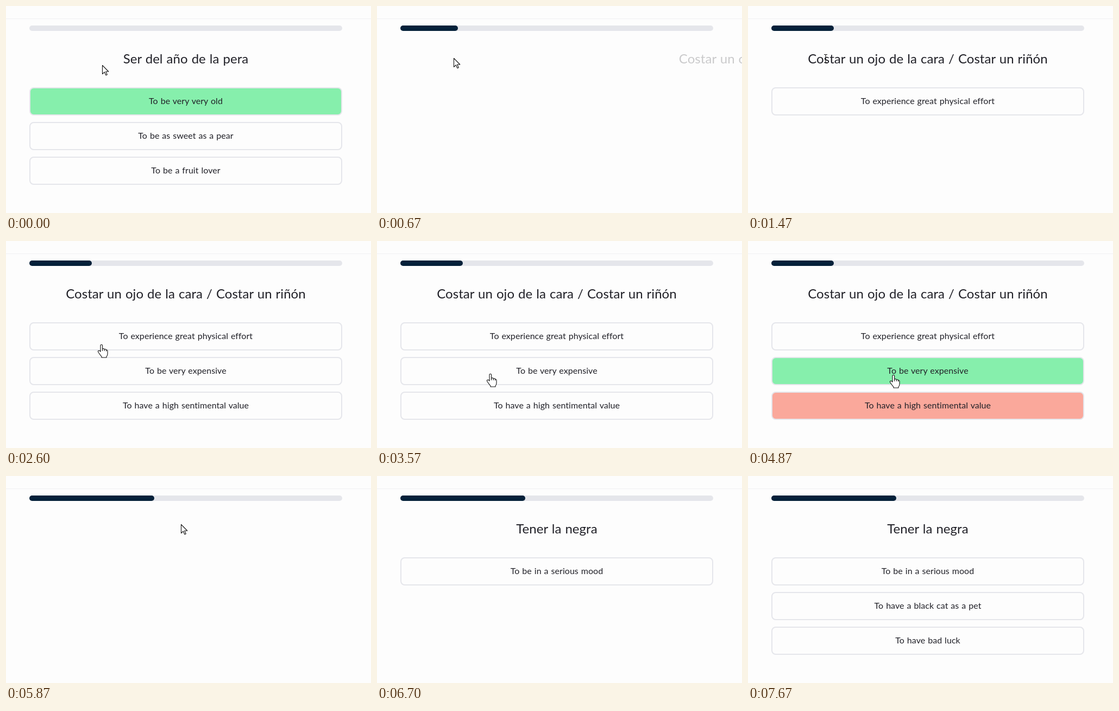
Write an HTML page that moves like this. It is 672 px wide and 382 px high and loops after 7.71 s.

```html
<!DOCTYPE html>
<html lang="en">
<head>
<meta charset="utf-8">
<title>Idiom quiz</title>
<style>
  html, body { margin: 0; width: 100%; height: 100%; overflow: hidden; }
  body {
    position: relative; background: #fdfdfd; color: #212128; cursor: default;
    font-family: Lato, "Open Sans", sans-serif;
    letter-spacing: .003em; word-spacing: .05em; text-align: center;
  }
  div, svg { position: absolute; box-sizing: border-box; }
  #rule { left: 0; top: 23px; width: 100%; height: 1px; background: #f0f0f2; }
  #track, #fill { left: 43px; top: 36px; width: 576px; height: 10px; border-radius: 5px; }
  #track { background: #e5e6eb; }
  #fill { background: #05213a; }
  #card { left: 43px; top: 0; width: 576px; height: 382px; }
  #title { top: 81px; width: 576px; font-size: 24px; line-height: 32px; white-space: nowrap; }
  .option {
    left: 0; width: 576px; height: 52px; border: 2px solid #e5e6eb; border-radius: 8px;
    font-size: 16px; line-height: 46px; white-space: nowrap;
  }
  #pointer { left: 0; top: 0; overflow: visible; }
  #pointer g { fill: #fff; stroke: #111; stroke-width: 1.1; stroke-linejoin: round; }
</style>
</head>
<body>
<div id="rule"></div>
<div id="track"></div>
<div id="fill"></div>
<div id="card"><div id="title"></div></div>
<svg id="pointer" width="1" height="1">
  <g id="arrow"><path d="M.5 .5V16.5L4.3 12.9L7 18.8L9.3 17.8L6.7 12H11.8Z"/></g>
  <g id="beam"><path fill="none" d="M-3-7.5H-1Q0-7.5 0-6.5Q0-7.5 1-7.5H3M0-6.5V6.5M-3 7.5H-1Q0 7.5 0 6.5Q0 7.5 1 7.5H3"/></g>
  <g id="hand">
    <path d="M-2 13V2a1.8 1.8 0 0 1 3.6 0V8q3.4-1 3.6 1q3-.8 3.4 1q2.4-.3 2.4 2.3v5q0 3-2 5v1.7h-9v-1.7q-3.5-4-6-8q-1.5-3 1-3t3 2z"/>
    <path fill="none" d="M1.6 8v4M5.2 9v3M8.6 10v2.5"/>
  </g>
</svg>
<script>
const LOOP = 7710, WIDTH = 576, DROP = 50;
const GOOD = '134,239,172', BAD = '250,168,155';

const scenes = [
  { enter: -5000, leave: 50, title: 'Ser del año de la pera', half: 115,
    options: ['To be very very old', 'To be as sweet as a pear', 'To be a fruit lover'],
    answer: -1000, colors: [GOOD] },
  { enter: 630, leave: 5250, title: 'Costar un ojo de la cara / Costar un riñón', half: 219,
    options: ['To experience great physical effort', 'To be very expensive', 'To have a high sentimental value'],
    answer: 4250, colors: [null, GOOD, BAD] },
  { enter: 5830, leave: 99999, title: 'Tener la negra', half: 75,
    options: ['To be in a serious mood', 'To have a black cat as a pet', 'To have bad luck'],
    answer: 99999, colors: [] }
];

// time, x, y of the pointer's hot spot
const path = [
  [0, 177, 109], [450, 141, 96], [1600, 143, 97], [2400, 170, 182], [3200, 205, 240],
  [3570, 209, 245], [4050, 250, 302], [4350, 254, 304], [4800, 268, 247],
  [5100, 270, 246], [5750, 322, 90], [5880, 322, 89], [6180, 340, -24]
];

const $ = id => document.getElementById(id);
const clamp = v => Math.min(1, Math.max(0, v));
const span = (t, start, length) => clamp((t - start) / length);
const easeOut = v => 1 - (1 - v) ** 3;
const smooth = v => v * v * (3 - 2 * v);
const move = (x, y) => `translate(${x}px,${y}px)`;

const options = [0, 1, 2].map(i => {
  const el = document.createElement('div');
  el.className = 'option';
  el.style.top = 150 + 64 * i + 'px';
  $('card').append(el);
  return el;
});

let shown;
function show(scene) {
  if (scene === shown) return;
  shown = scene;
  $('title').textContent = scene.title;
  options.forEach((el, i) => el.textContent = scene.options[i]);
}

function pointerAt(t) {
  const next = path.findIndex(p => p[0] > t);
  if (next < 0) return path[path.length - 1].slice(1);
  const [t0, x0, y0] = path[next - 1], [t1, x1, y1] = path[next];
  const k = smooth((t - t0) / (t1 - t0));
  return [x0 + (x1 - x0) * k, y0 + (y1 - y0) * k];
}

// offset by (dx, dy) and clear at 0, in place and solid at 1
function fly(el, amount, dx, dy) {
  el.style.transform = move(dx * (1 - amount), dy * (1 - amount));
  el.style.opacity = amount;
}

function drawCard(t, scene) {
  const stay = 1 - span(t, scene.leave, 340) ** 2;
  const mark = span(t, scene.answer, 150);
  fly($('title'), stay * easeOut(span(t, scene.enter, 500)), WIDTH, 0);
  options.forEach((el, i) => {
    fly(el, stay * easeOut(span(t, scene.enter + 420 + 500 * i, 400)), 0, -DROP);
    el.style.background = scene.colors[i] ? `rgba(${scene.colors[i]},${mark})` : 'none';
  });
}

function drawPointer(t, scene) {
  const [x, y] = pointerAt(t);
  const row = Math.floor((y - 150) / 64);
  const here = t < scene.leave + 150;
  const overTitle = t > scene.enter + 350 && Math.abs(x - 331) < scene.half && y > 84 && y < 113;
  const overOption = row >= 0 && row < 3 && (y - 150) % 64 < 52 && t > scene.enter + 600 + 500 * row;
  const kind = here && overTitle ? 'beam' : here && overOption ? 'hand' : 'arrow';
  for (const id of ['arrow', 'beam', 'hand']) $(id).style.display = id === kind ? '' : 'none';
  $('pointer').style.transform = move(Math.round(x), Math.round(y));
}

function draw(t) {
  const scene = scenes.filter(s => s.enter <= t).pop();
  show(scene);
  drawCard(t, scene);
  drawPointer(t, scene);
  const done = .2 * (easeOut(span(t, 270, 700)) + easeOut(span(t, 5230, 700)));
  $('fill').style.width = WIDTH * done + 'px';
}

const start = performance.now();
function tick() {
  draw((performance.now() - start) % LOOP);
  requestAnimationFrame(tick);
}
tick();
</script>
</body>
</html>
```
